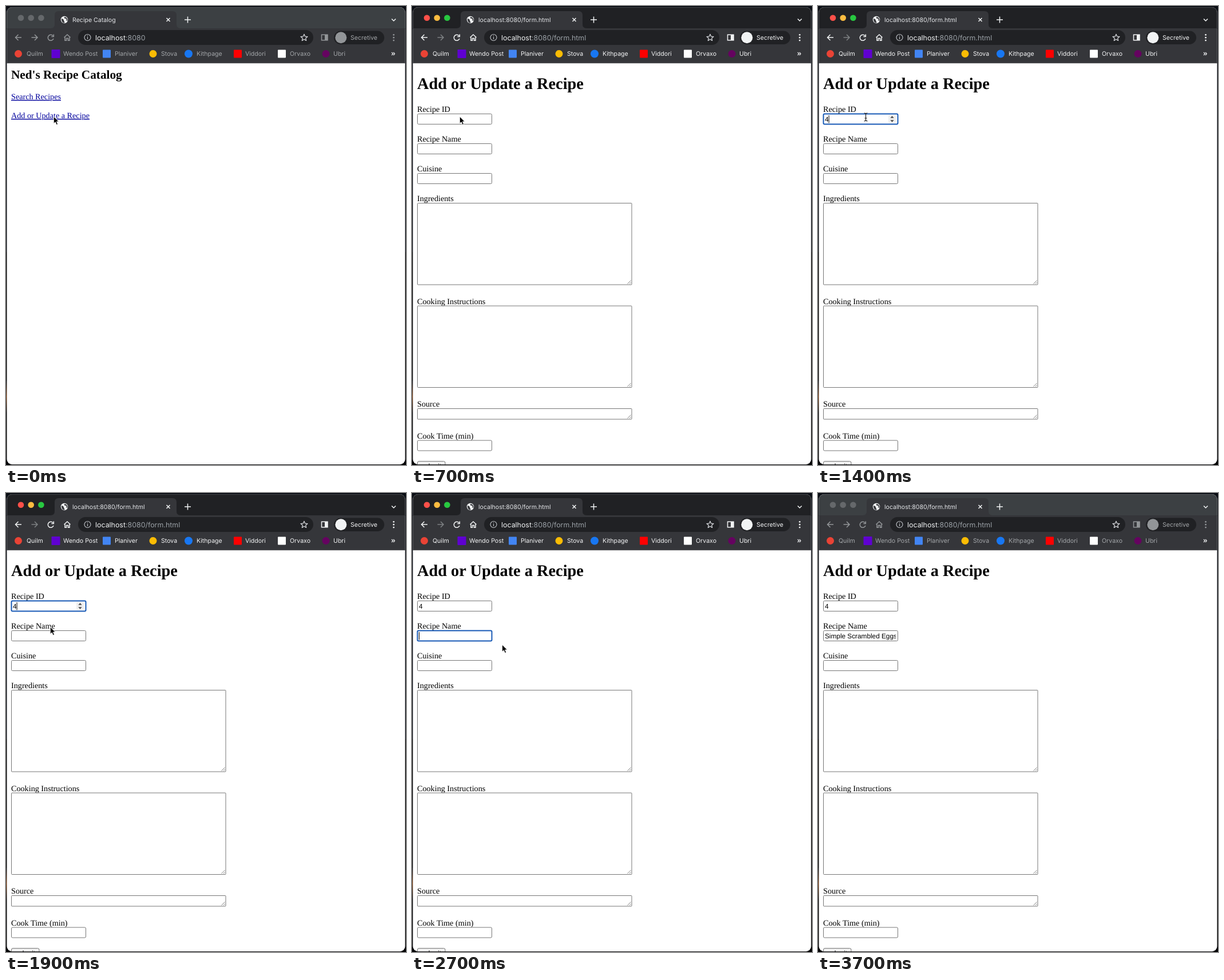
Write an HTML page that moves like this. It is 699 by 802 pixels and loops after 8 s.

```html
<!DOCTYPE html>
<html lang="en">
<head>
<meta charset="utf-8">
<title>Recipe Catalog</title>
<style>
  html, body { margin: 0; width: 100%; height: 100%; overflow: hidden; background: #0a0d14; }
  svg { display: block; width: 699px; height: 802px; text-rendering: geometricPrecision; }
  svg { --strip: #3c4043; --tool: #929598; --mark: #a3a6a9; --next: var(--tool); --edge: #5b5e61; }
  svg.active { --strip: #202124; --tool: #f1f3f4; --mark: #f4f5f6; --edge: #45474a; }
  svg.active.form { --next: #7d8083; }
  .ui { font: 10.6px Inter, sans-serif; }
  .url { font: 12.4px Inter, sans-serif; fill: #9aa0a6; }
  .page { font: 14.18px "Liberation Serif", serif; }
  .field { font: 11.8px "Liberation Sans", sans-serif; }
  .link { fill: #00009c; text-decoration: underline; }
  .line { fill: none; stroke-width: 1.5; }
  .thin { stroke-width: 1.2; }
  .box { fill: #fff; stroke: #767676; }
  .focus { stroke: #1759b5; stroke-width: 2; }
  .hide { display: none; }
</style>
</head>
<body>
<svg id="stage" viewBox="0 0 699 802">
  <defs>
    <clipPath id="frame"><rect x="1.5" y="2" width="696" height="799" rx="9"/></clipPath>
    <clipPath id="nameClip"><rect x="12" y="241" width="124.2" height="17"/></clipPath>
    <linearGradient id="glow" x2="0" y2="1">
      <stop stop-color="#0a0d14"/><stop offset=".5" stop-color="#6b3a16"/><stop offset="1" stop-color="#08080a"/>
    </linearGradient>
  </defs>
  <rect width="699" height="802" fill="#0a0d14"/>
  <rect y="430" width="699" height="372" fill="#040406"/>
  <rect y="655" width="2" height="55" fill="url(#glow)"/>

  <g clip-path="url(#frame)">
    <rect width="699" height="802" fill="#fff"/>
    <rect width="699" height="40" fill="var(--strip)"/>
    <path d="M2 11Q2 2.5 11 2.5H688Q697 2.5 697 11" fill="none" stroke="var(--edge)"/>
    <path d="M0 39H78Q85 39 85 32V16Q85 9 92 9H291Q298 9 298 16V32Q298 39 305 39H699V100H0Z" fill="#35363a"/>
    <path d="M0 99.7H699" stroke="#505256"/>
    <g id="lights"></g>

    <g class="ui">
      <circle cx="102" cy="24" r="6.2" fill="#f1f3f4"/>
      <path d="M97 22Q101 23 101 25T103 29L100 29.5Q96.5 27 97 22M102 19Q101 22 104 22T105 25L107.5 26Q108.5 20 102 19" fill="#35363a"/>
      <text id="title" x="116" y="27.8" fill="#e3e5e8"></text>
      <g class="line" stroke="#f1f3f4">
        <path d="M280.5 21l6 6m0-6l-6 6"/>
        <path d="M312 24h11m-5.5-5.5v11M674 22.5l3.5 3.5l3.5-3.5"/>
      </g>

      <rect x="126" y="42" width="411" height="26" rx="13" fill="#202124"/>
      <g class="line" stroke="var(--tool)">
        <path d="M27 55H16.5m5-5l-5 5l5 5"/>
        <path d="M44.5 55H55m-5-5l5 5l-5 5" stroke="var(--next)"/>
        <path d="M82 52A5 5 0 1 0 83 57M83.3 49.5V53.5H79.3"/>
        <path d="M101.5 55L107 50L112.5 55M103 54.5V60.3H105.5V56.5H108.5V60.3H111V54.5"/>
        <rect x="551.5" y="50.2" width="10.5" height="9.6"/>
      </g>
      <rect x="557" y="50" width="5" height="10" fill="var(--tool)"/>
      <g class="line thin" stroke="#bdc1c6">
        <circle cx="142.5" cy="55" r="5.5"/>
        <path d="M142.5 54v4M142.5 51.5v1.3"/>
      </g>
      <path class="line thin" stroke="#dadce0" stroke-linejoin="round"
        d="M521 49.2L522.7 53.2L527 53.5L523.7 56.3L524.7 60.5L521 58.2L517.3 60.5L518.3 56.3L515 53.5L519.3 53.2Z"/>
      <text class="url" x="156" y="59.5"><tspan fill="#f1f3f4">localhost</tspan>:8080<tspan id="path"></tspan></text>

      <rect x="573" y="43.5" width="88" height="23.5" rx="11.75" fill="#202124"/>
      <circle cx="585.3" cy="55.3" r="10" fill="var(--tool)"/>
      <text x="602" y="59.3" fill="var(--mark)">Secretive</text>
      <g fill="var(--tool)">
        <circle cx="677.5" cy="50.3" r="1.4"/><circle cx="677.5" cy="55.2" r="1.4"/><circle cx="677.5" cy="60.1" r="1.4"/>
      </g>
      <g id="bookmarks" fill="var(--mark)"></g>
      <path class="line thin" stroke="#f1f3f4" d="M674 81l2.3 2.5l-2.3 2.5M677 81l2.3 2.5l-2.3 2.5"/>
    </g>

    <g id="home" class="page">
      <text x="9" y="127" font-size="21.27" font-weight="bold">Ned's Recipe Catalog</text>
      <text class="link" x="9" y="163">Search Recipes</text>
      <text class="link" x="9" y="196">Add or Update a Recipe</text>
    </g>

    <g id="form" class="page">
      <text x="9" y="145" font-size="28.36" font-weight="bold">Add or Update a Recipe</text>
      <g id="fields"></g>
      <g id="spinner">
        <rect x="123" y="190.5" width="13.5" height="14" fill="#efefef"/>
        <path d="M126.3 195.7l3.2-3.7l3.2 3.7zM126.3 199.3l3.2 3.7l3.2-3.7z" fill="#505050"/>
      </g>
      <g class="field">
        <text id="idText" x="12" y="201.7"></text>
        <g clip-path="url(#nameClip)"><text id="nameText" y="253.7"></text></g>
        <rect x="9.5" y="795.5" width="48.5" height="19" rx="2.5" fill="#efefef" stroke="#767676"/>
        <text x="33.7" y="808" text-anchor="middle">submit</text>
      </g>
      <rect id="caret" width="1" height="13.5"/>
    </g>
  </g>

  <path id="arrow" d="M0 0V12.5L2.9 9.8L5 14.6L7.2 13.6L5.2 9H9Z" stroke="#fff" stroke-width=".9"/>
  <path id="beam" class="line thin" stroke="#222" d="M-3-7Q0-7 0-5Q0-7 3-7M0-5V5M-3 7Q0 7 0 5Q0 7 3 7M-2 2H2"/>
</svg>

<script>
const $ = id => document.getElementById(id);
const stage = $('stage');
const LOOP = 8000;
const RECIPE = 'Simple Scrambled Eggs';

// label, icon centre, text start, icon colour, icon width, round?
const bookmarks = [
  ['Quilm', 21.5, 36, '#ea4335', 13, true],
  ['Wendo Post', 87, 100, '#5f01d1', 15],
  ['Planiver', 176, 190, '#4285f4', 14],
  ['Stova', 257, 271, '#fbbc04', 13, true],
  ['Kithpage', 319, 333, '#1877f2', 14, true],
  ['Viddori', 405, 418, '#f00', 14],
  ['Orvaxo', 482, 496, '#fff', 14],
  ['Ubri', 559, 572, '#650360', 13, true]
];
$('bookmarks').innerHTML = bookmarks.map(([label, cx, x, color, w, round]) =>
  `<rect x="${cx - w / 2}" y="${83.5 - w / 2}" width="${w}" height="${w}" rx="${round ? w / 2 : 1}" fill="${color}"/>
   <text x="${x}" y="87.3">${label}</text>`).join('');

const lightColors = ['#fe5049', '#fdbc40', '#28c840'];
$('lights').innerHTML = [26, 43.7, 61.4].map(x => `<circle cx="${x}" cy="20.8" r="5.3"/>`).join('');

// label, baseline, box top, box width, box height
const fields = [
  ['Recipe ID', 185, 188.5, 130, 18],
  ['Recipe Name', 237, 240.5, 130, 18],
  ['Cuisine', 289, 292.5, 130, 18],
  ['Ingredients', 341, 344.5, 374.5, 142.5],
  ['Cooking Instructions', 520.5, 524, 374.5, 142.5],
  ['Source', 700, 703.5, 374.5, 18.5],
  ['Cook Time (min)', 755.5, 759, 130, 18]
];
$('fields').innerHTML = fields.map(([label, base, y, w, h]) =>
  `<text x="9" y="${base}">${label}</text>
   <rect class="box" x="9.5" y="${y}" width="${w}" height="${h}" rx="${w > 200 ? 1 : 2}"/>` +
  (w > 200 ? `<path d="M376.5 ${y + h - 1.5}l6-6m-2.5 6l2.5-2.5" stroke="#777" stroke-width=".9"/>` : '')).join('');
const boxes = document.querySelectorAll('.box');

// time, pointer shape, x, y; each holds until the next
const pointer = [
  [0, 'arrow', 83.3, 193], [800, 'beam', 83.5, 194], [1500, ''],
  [1900, 'arrow', 77.3, 234], [2000, 'beam', 76, 250], [2700, 'arrow', 157.5, 265],
  [2800, 'arrow', 381, 301], [2900, 'arrow', 604, 337], [3000, '']
];

const show = (id, on) => $(id).classList.toggle('hide', !on);

function draw(t) {
  const active = t >= 200 && t < 3700;
  const form = t >= 700;
  const focus = !active || t < 1100 ? -1 : t < 2100 ? 0 : 1;

  stage.classList.toggle('active', active);
  stage.classList.toggle('form', form);
  [...$('lights').children].forEach((dot, i) => dot.setAttribute('fill', active ? lightColors[i] : '#65686b'));
  show('home', !form);
  show('form', form);
  $('title').textContent = form ? 'localhost:8080/form.html' : 'Recipe Catalog';
  $('path').textContent = form ? '/form.html' : '';

  boxes.forEach((box, i) => box.classList.toggle('focus', i === focus));
  show('spinner', focus === 0 || t >= 800 && t < 1100);
  $('idText').textContent = t >= 1400 ? '4' : '';

  const name = $('nameText');
  const typed = Math.max(0, Math.floor((t - 2900) / 100) * 7);
  const scrolled = active && typed >= RECIPE.length;
  name.textContent = RECIPE.slice(0, typed);
  name.setAttribute('x', scrolled ? 136 : 12);
  name.setAttribute('text-anchor', scrolled ? 'end' : 'start');

  const textWidth = form ? (focus === 0 ? $('idText') : name).getComputedTextLength() : 0;
  show('caret', focus >= 0 && t < 3400);
  $('caret').setAttribute('x', Math.min(135, 12 + textWidth));
  $('caret').setAttribute('y', focus === 0 ? 191 : 243);

  const [, shape, x, y] = pointer.findLast(step => step[0] <= t);
  for (const id of ['arrow', 'beam']) {
    show(id, id === shape);
    if (id === shape) $(id).setAttribute('transform', `translate(${x} ${y})`);
  }
}

const start = performance.now();
function tick() {
  draw((performance.now() - start) % LOOP);
  requestAnimationFrame(tick);
}
tick();
</script>
</body>
</html>
```
